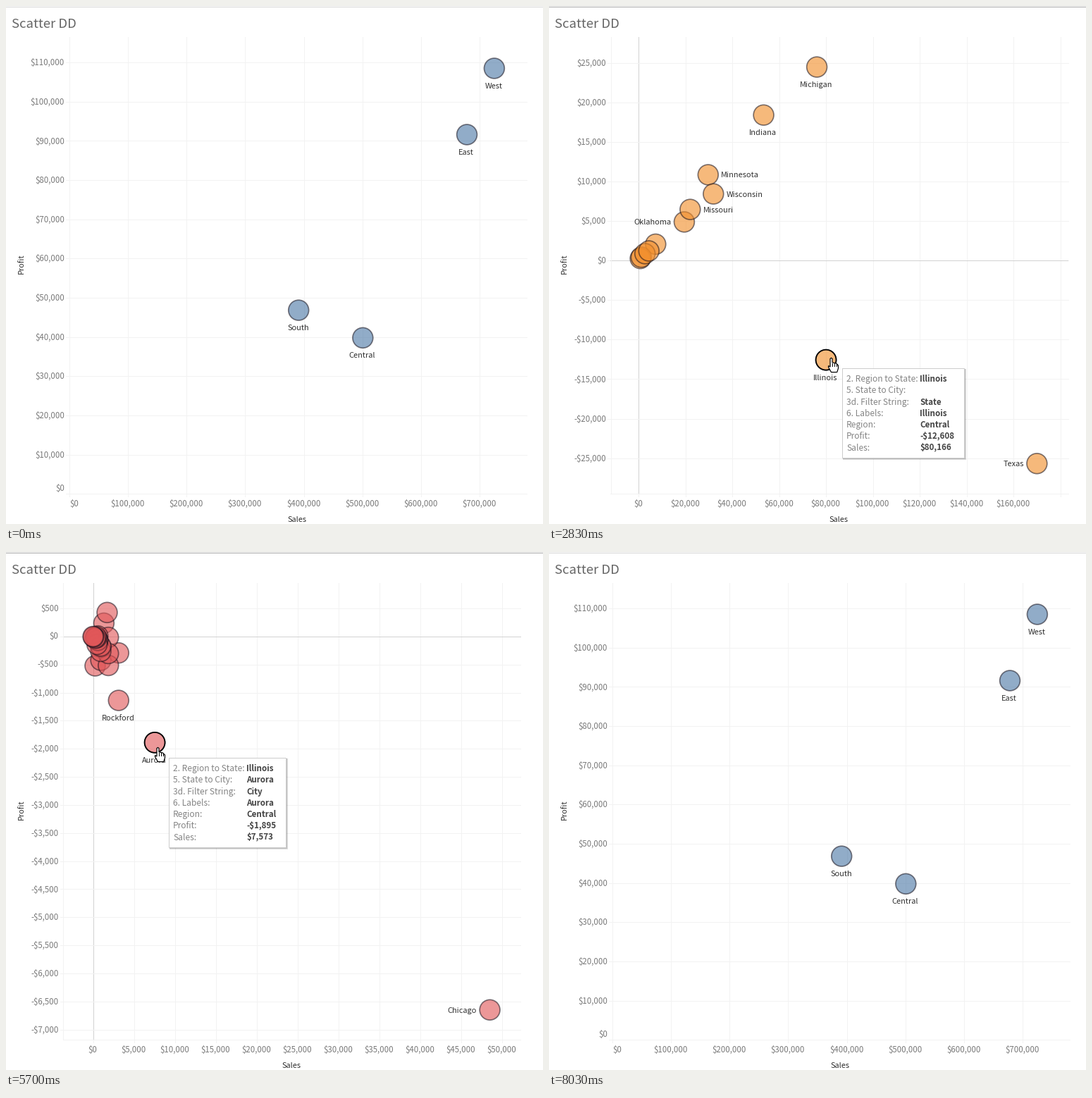
A matplotlib script that plays this animation: 762 by 735 pixels, repeating every 8.97 s.

```python
import numpy as np
import matplotlib.pyplot as plt
from matplotlib.animation import FuncAnimation
from matplotlib.colors import to_rgba
from matplotlib.patches import Circle, Polygon, Rectangle

W, H, DPI = 762, 735, 100
LOOP, STEP = 8970, 30
PX = 72 / DPI
TOP, BOTTOM = 44, 691.5
INK, TICK, GRID, RED = "#303030", "#7a7a7a", "#f2f2f2", "#e15759"
EDGE = (0.08, 0.06, 0.1, 0.54)
plt.rcParams["font.family"] = "Noto Sans CJK JP"
plt.rcParams["toolbar"] = "None"

fig = plt.figure(figsize=(W / DPI, H / DPI), dpi=DPI, facecolor="white")
ax = fig.add_axes([0, 0, 1, 1])
ax.set(xlim=(0, W), ylim=(H, 0))
ax.axis("off")


def put(x, y, s, size, color, ha="center", z=5, **kw):
    """Text whose capitals are centred on y; size in pixels."""
    return ax.text(x, y + 0.365 * size, s, fontsize=size * PX, color=color,
                   ha=ha, va="baseline", zorder=z, parse_math=False, **kw)


def line(x0, y0, x1, y1, color=GRID, style="-"):
    return ax.plot([x0, x1], [y0, y1], color=color, lw=PX, ls=style, zorder=1)[0]


def pixel(v):
    return np.floor(v) + 0.5


def money(v):
    return f"{'-' if v < 0 else ''}${abs(v):,}"


class Chart:
    """Scatter plot of (name, sales, profit, label side) marks."""

    def __init__(self, level, color, left, origin, scale, sales, profits, marks):
        self.level, self.color = level, color
        self.left, self.right = left, left + 649.5
        self.origin, self.scale = origin, scale
        self.parts, self.dots, self.labels = [], {}, {}
        self.data = {name: (s, p) for name, s, p, _ in marks}
        for v in sales:
            self.column(v)
        for v in profits:
            self.row(v)
        self.parts += [line(left, BOTTOM, self.right, BOTTOM),
                       line(pixel(left), TOP, pixel(left), BOTTOM),
                       put(left + 324, 728, "Sales", 11, INK)]
        for n, mark in enumerate(marks):
            self.mark(n, *mark)

    def at(self, sales, profit):
        return (self.origin[0] + sales * self.scale[0],
                self.origin[1] - profit * self.scale[1])

    def zero(self, *ends):
        self.parts.append(line(*ends, color="#b4b4b4", style=(0, (1, 1))))

    def column(self, v):
        x = self.at(v, 0)[0]
        q = pixel(x)
        self.parts.append(line(q, TOP, q, BOTTOM + 4))
        if x < self.right - 20:
            self.parts.append(put(max(x, self.left + 8), 705.8, money(v), 11.5, TICK))
        if v == 0 and x > self.left + 5:
            self.zero(q, TOP, q, BOTTOM)

    def row(self, v):
        y = self.at(0, v)[1]
        q = pixel(y)
        self.parts += [line(self.left - 4, q, self.right, q),
                       put(self.left - 6, min(y, BOTTOM - 7.2), money(v),
                           11.5, TICK, "right")]
        if v == 0 and y < BOTTOM - 5:
            self.zero(self.left, q, self.right, q)

    def mark(self, n, name, sales, profit, side):
        x, y = self.at(sales, profit)
        dot = Circle((x, y), 14.4, fc=to_rgba(self.color, 0.62), ec=EDGE,
                     lw=1.7 * PX, zorder=2 + n * 0.01)
        self.dots[name] = ax.add_patch(dot)
        self.parts.append(dot)
        if side:
            dx, dy, ha = {"below": (-0.8, 24.5, "center"), "right": (18.5, 0, "left"),
                          "left": (-18.5, 0, "right")}[side]
            self.labels[name] = put(x + dx, y + dy, name, 11, INK, ha)
            self.parts.append(self.labels[name])

    def show(self, on):
        for part in self.parts:
            part.set_visible(on)

    def mark_under(self, x, y):
        for name in self.labels:
            cx, cy = self.dots[name].center
            if np.hypot(x - cx, y - cy) < 15.5:
                return name

    def tooltip(self, name):
        sales, profit = self.data[name]
        state, city = {"Region": ("", ""), "State": (name, ""),
                       "City": ("Illinois", name)}[self.level]
        return [state, city, self.level, name, "Central", money(profit), money(sales)]


def small_cities(count=16):
    rng = np.random.default_rng(4)
    sales = np.sort(rng.exponential(650, count).clip(0, 1900))[::-1]
    profits = -sales * rng.uniform(-0.05, 0.3, count)
    return [(f"city {i}", s, p, "") for i, (s, p) in enumerate(zip(sales, profits))]


regions = Chart(
    "Region", "#4e79a7", 89, (89.3, 691.8), (83.2e-5, 55.65e-4),
    range(0, 700001, 100000), range(0, 110001, 10000),
    [("West", 725458, 108418, "below"), ("East", 678781, 91523, "below"),
     ("South", 391722, 46749, "below"), ("Central", 501240, 39706, "below")])

states = Chart(
    "State", "#f28e2b", 87, (126.5, 360.8), (66.5 / 20000, 56.05 / 5000),
    range(0, 180001, 20000), range(-25000, 25001, 5000),
    [("Michigan", 76270, 24463, "below"), ("Indiana", 53555, 18383, "below"),
     ("Minnesota", 29863, 10823, "right"), ("Wisconsin", 32115, 8402, "right"),
     ("Oklahoma", 19683, 4854, "left"), ("Missouri", 22205, 6436, "right"),
     ("Illinois", 80166, -12608, "below"), ("Texas", 170188, -25729, "left"),
     ("Nebraska", 7465, 2037, ""), ("North Dakota", 920, 230, ""),
     ("South Dakota", 1316, 395, ""), ("Kansas", 2914, 836, ""),
     ("Iowa", 4580, 1184, "")])

cities = Chart(
    "City", RED, 80.5, (123.2, 119.3), (58.03 / 5000, 39.85 / 500),
    range(0, 50001, 5000), range(-7000, 501, 500),
    [("Joliet", 1350, 230, ""), ("Peoria", 1750, 420, ""),
     ("Elmhurst", 3150, -300, ""), ("Decatur", 280, -530, ""),
     ("Naperville", 980, -430, "")] + small_cities() +
    [("Rockford", 3150, -1145, "below"), ("Aurora", 7573, -1895, "below"),
     ("Chicago", 48540, -6655, "left")])

put(8, 23.8, "Scatter DD", 18.5, "#666666", "left", weight="light")
ax.text(21.5, 366, "Profit", fontsize=11 * PX, color=INK, rotation=90,
        ha="center", va="center")
top_line = line(0, 0.5, W, 0.5)

# Tooltip
TIP_KEYS = ["2. Region to State:", "5. State to City:", "3d. Filter String:",
            "6. Labels:", "Region:", "Profit:", "Sales:"]
shadows = [ax.add_patch(Rectangle((0, 0), 1, 1, fc=(0, 0, 0, 0.13), lw=0, zorder=6))
           for _ in range(3)]
tip_box = ax.add_patch(Rectangle((0, 0), 1, 127, fc="white", ec="#cccccc",
                                 lw=PX, zorder=7))
tip_keys = [put(0, 0, s, 12, "#858585", "left", 8) for s in TIP_KEYS]
tip_values = [put(0, 0, "", 11.6, "#444444", "left", 8, weight="bold")
              for _ in TIP_KEYS]

# Hover outline, click glow and pointers
ring = ax.add_patch(Circle((0, 0), 14.5, fc="none", ec="black", zorder=4))
glow = ax.add_patch(Circle((0, 0), 11, fc=(1, 1, 0, 0.55), lw=0, zorder=9))
ARROW = np.array([(0, 0), (0, 20.5), (4.7, 16.3), (8.6, 25), (11.6, 23.7),
                  (8, 15.2), (14, 14.6)])
HAND = np.array([(-1.5, 1.5), (0, 0.3), (1.5, 1.5), (1.5, 6.8), (7, 8),
                 (10, 11), (10, 15), (8.2, 20.6), (0, 20.6), (-4, 13.5),
                 (-4, 11.5), (-1.5, 13)])
arrow = ax.add_patch(Polygon(ARROW, fc="black", ec="white", lw=0.6 * PX, zorder=10))
hand = ax.add_patch(Polygon(HAND, fc="white", ec="black", lw=1.2 * PX, zorder=10))
knuckles = [ax.plot([], [], color="black", lw=PX, zorder=11)[0] for _ in range(3)]

# Pointer moves: start, end, goal
ENTRY = (600, 698)
MOVES = [(210, 680, (516, 480)), (1930, 2830, (400, 499)),
         (4640, 4940, (270, 330)), (4940, 5390, (215, 277)),
         (6340, 6870, (212, 284)), (6890, 6950, (216, 275)),
         (7800, 8030, (560, 735))]
CLICKS = [(990, 1140), (3380, 3460), (5620, 5700), (7100, 7330)]
TO_STATES, LOADING, TO_CITIES, SELECT, TO_REGIONS = 1370, 3690, 3840, 5930, 7330


def pointer(t):
    pos = np.array(ENTRY, float)
    for start, end, goal in MOVES:
        u = np.clip((t - start) / (end - start), 0, 1)
        pos += (np.array(goal) - pos) * (1 - (1 - u) ** 2)
    return pos


def mix(a, b, k):
    return tuple((1 - k) * np.array(to_rgba(a)) + k * np.array(to_rgba(b)))


def fade_cities(k):
    """Dim every city except the selected one; k runs from 0 to 1."""
    plain = to_rgba(RED, 0.62)
    for name, dot in cities.dots.items():
        if name == "Aurora":
            dot.set_facecolor(mix(plain, RED, k))
        else:
            dot.set_facecolor(mix(plain, to_rgba("#eed6d6", 0.62), k))
            dot.set_edgecolor(mix(EDGE, to_rgba("#cbc2c2", 0.75), k))
    for name in ("Rockford", "Chicago"):
        cities.labels[name].set_color(mix(INK, "#d0d0d0", k))


def place_tip(x, y, values):
    x, y = pixel(x), pixel(y)
    width = 118 + 6.9 * max(map(len, values[-2:]))
    tip_box.set_bounds(x, y, width, 127)
    for i, shadow in enumerate(shadows):
        shadow.set_bounds(x + 1, y + 1, width + i + 0.5, 127 + i + 0.5)
    for i, (key, value) in enumerate(zip(tip_keys, tip_values)):
        base = y + 15.3 + 16.25 * i + 4.4
        key.set_position((x + 6.5, base))
        value.set_position((x + 110.5, base))
        value.set_text(values[i])


def update(frame):
    t = frame * STEP + 20
    current = (regions if t < TO_STATES or t >= TO_REGIONS else
               states if t < TO_CITIES else cities)
    for chart in (regions, states, cities):
        chart.show(chart is current)
    if current is cities:
        fade_cities(np.clip((t - SELECT) // 77 + 1, 0, 4) / 4)

    inside = MOVES[0][0] <= t < MOVES[-1][1]
    top_line.set_color("#a8a8a8" if inside else "#d4d4d4")
    x, y = pointer(t)
    name = current.mark_under(x, y) if inside else None
    for part in [tip_box, ring, *shadows, *tip_keys, *tip_values]:
        part.set_visible(name is not None)
    if name:
        place_tip(x + 15, y + 14.6, current.tooltip(name))
        ring.center = current.dots[name].center
        ring.set_linewidth((2.8 if t >= SELECT else 1.7) * PX)

    pointing = name is not None and not LOADING <= t < TO_CITIES
    arrow.set_visible(inside and not pointing)
    arrow.set_xy(ARROW + (x, y))
    hand.set_visible(pointing)
    hand.set_xy(HAND + (x + 0.5, y))
    for i, knuckle in enumerate(knuckles):
        kx = x + 2.2 + 3 * i
        knuckle.set_data([kx, kx], [y + 7.5 + i * 0.7, y + 12])
        knuckle.set_visible(pointing)
    glow.center = (x, y)
    glow.set_visible(any(a <= t < b for a, b in CLICKS))
    return []


anim = FuncAnimation(fig, update, frames=LOOP // STEP, interval=STEP,
                     init_func=lambda: update(0), repeat=True, repeat_delay=0,
                     blit=False)
plt.show()
```
